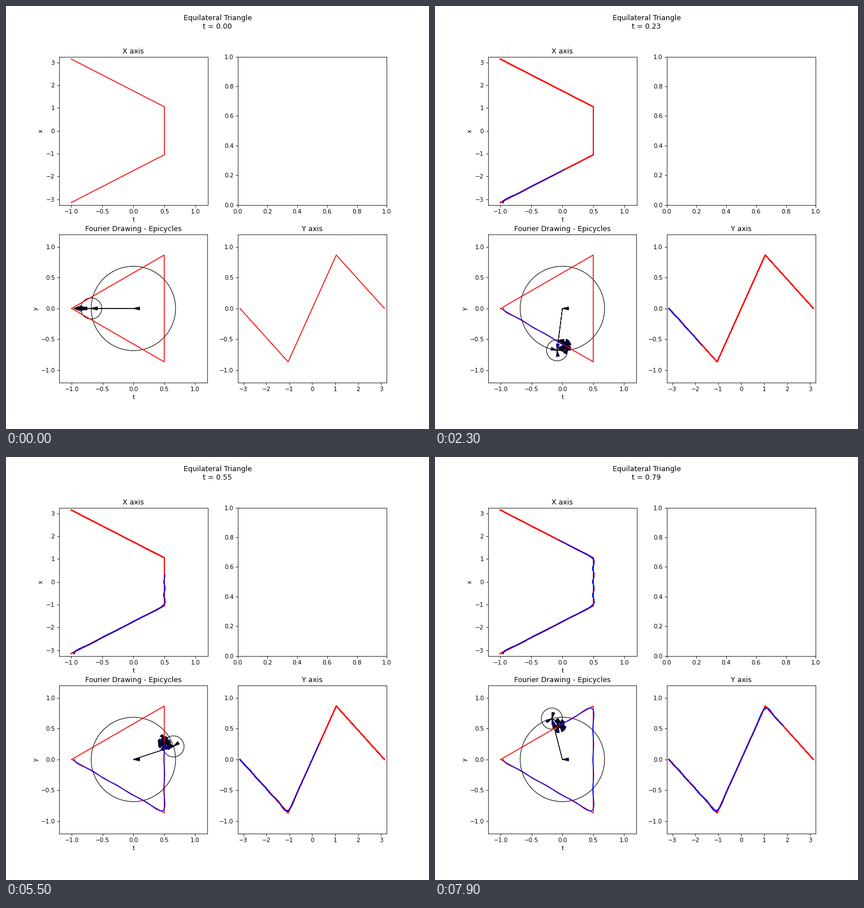
A matplotlib script that plays this animation: 748 px wide and 748 px high, repeating every 8 s.

```python
import numpy as np
import matplotlib.pyplot as plt
from matplotlib.animation import FuncAnimation
from matplotlib.patches import Circle, FancyArrow

FRAMES = 80
STEP = 0.01      # turns per frame
ORDER = 10       # highest harmonic
LAYERS = 30      # overdrawn strokes kept in the axis plots

# Harmonics in the order 0, 1, -1, 2, -2, ...
freqs = np.array([0] + [s * n for n in range(1, ORDER + 1) for s in (1, -1)])
radii = np.array([6.75 / (np.pi * n) ** 2 if n % 3 == 1 else 1e-6 for n in freqs])


def vectors(turn):
    return -radii * np.exp(2j * np.pi * freqs * turn)


turns = np.arange(FRAMES) * STEP
tau = 2 * np.pi * turns - np.pi
trace = np.array([vectors(u).sum() for u in turns])

corner_t = np.array([-3, -1, 1, 3]) * np.pi / 3
corners = np.exp(1j * corner_t)

fig, ((ax_x, ax_blank), (ax_epi, ax_y)) = plt.subplots(2, 2, figsize=(10, 10), dpi=74.8)
heading = fig.suptitle("")

span = np.pi + 0.1
ax_x.set(title="X axis", xlabel="t", ylabel="x", xlim=(-1.2, 1.2), ylim=(-span, span))
ax_y.set(title="Y axis", xlim=(-span, span), ylim=(-1.2, 1.2))
ax_epi.set(title="Fourier Drawing - Epicycles", xlabel="t", ylabel="y",
           xlim=(-1.2, 1.2), ylim=(-1.2, 1.2), aspect="equal")

ax_epi.plot(corners.real, corners.imag, "r")
epi_trace, = ax_epi.plot([], [], "b")


def stroke_pair(ax, x, y):
    red, = ax.plot(x, y, "r")
    blue, = ax.plot([], [], "b")
    return red, blue


layers = [(stroke_pair(ax_x, corners.real, corner_t),
           stroke_pair(ax_y, corner_t, corners.imag)) for _ in range(LAYERS)]


def draw_layers(k):
    # Strokes pile up over time, which hardens their soft edges.
    for j, (px, py) in enumerate(layers):
        m = k - LAYERS + 1 + j
        for line in px + py:
            line.set_visible(m >= 0)
        if m >= 0:
            px[1].set_data(trace.real[:m + 1], tau[:m + 1])
            py[1].set_data(tau[:m + 1], trace.imag[:m + 1])


def draw_epicycles(k):
    for patch in list(ax_epi.patches):
        patch.remove()
    pos = 0j
    for r, v in zip(radii, vectors(turns[k])):
        ax_epi.add_patch(Circle((pos.real, pos.imag), r, fill=False, ec="k"))
        ax_epi.add_patch(FancyArrow(pos.real, pos.imag, v.real, v.imag, width=0.001,
                                    head_width=0.05, head_length=0.1,
                                    length_includes_head=True, fc="b", ec="k"))
        pos += v
    epi_trace.set_data(trace.real[:k + 1], trace.imag[:k + 1])


def update(k):
    heading.set_text(f"Equilateral Triangle\nt = {turns[k]:.2f}")
    draw_layers(k)
    draw_epicycles(k)
    return []


anim = FuncAnimation(fig, update, frames=FRAMES, interval=100, repeat=True, repeat_delay=0)
plt.show()
```
